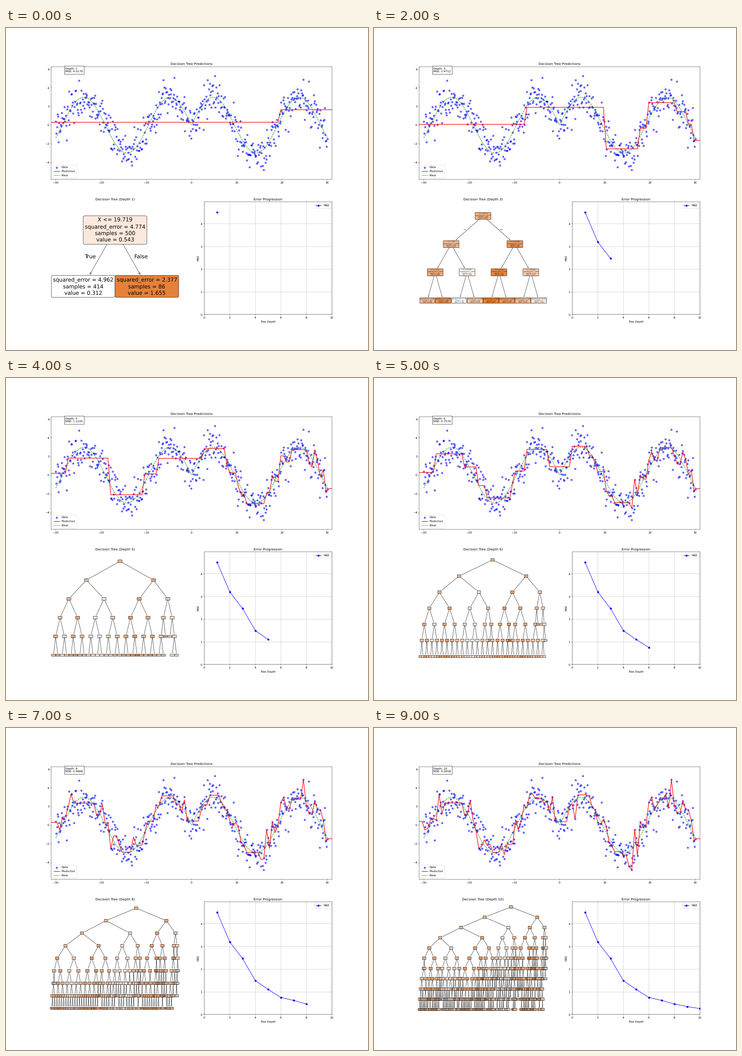
Write a matplotlib script that moves like this. It is 794 by 706 pixels and loops after 10 s.

```python
import numpy as np
import matplotlib.pyplot as plt
from matplotlib.animation import FuncAnimation
from matplotlib.gridspec import GridSpec

plt.rcParams["text.hinting"] = "none"

W, H, DPI = 794, 706, 44
MAX_DEPTH = 10
LEAF_RGB = np.array([229, 129, 57]) / 255


def wave(x):
    return 3 * np.sin(0.33 * np.abs(x))


class Node:
    """Regression tree node over the sorted samples lo..hi."""

    def __init__(self, lo, hi, depth=0):
        part = y[lo:hi]
        self.n, self.depth = hi - lo, depth
        self.value, self.error = part.mean(), part.var()
        self.kids, self.x = [], 0.0
        if depth < MAX_DEPTH and self.n > 1:
            left = np.cumsum(part)[:-1]
            count = np.arange(1, self.n)
            gain = left**2 / count + (part.sum() - left)**2 / (self.n - count)
            cut = lo + 1 + int(np.argmax(gain))
            self.threshold = (X[cut - 1] + X[cut]) / 2
            self.kids = [Node(lo, cut, depth + 1), Node(cut, hi, depth + 1)]

    def children(self, limit):
        return self.kids if self.depth < limit else []

    def walk(self, limit):
        yield self
        for kid in self.children(limit):
            yield from kid.walk(limit)

    def label(self, limit):
        lines = [f"squared_error = {round(float(self.error), 3)}",
                 f"samples = {self.n}",
                 f"value = {round(float(self.value), 3)}"]
        if self.children(limit):
            lines.insert(0, f"X <= {round(float(self.threshold), 3)}")
        return "\n".join(lines)


def cuts(node, limit):
    """Thresholds from left to right."""
    if not node.children(limit):
        return []
    a, b = node.kids
    return cuts(a, limit) + [node.threshold] + cuts(b, limit)


def leaves(node, limit):
    return [n for n in node.walk(limit) if not n.children(limit)]


def arrange(node, limit):
    """Set each child's offset; return the left and right contours."""
    if not node.children(limit):
        return [0.0], [0.0]
    a, b = node.kids
    a_left, a_right = arrange(a, limit)
    b_left, b_right = arrange(b, limit)
    gap = max(r - l + 1 for r, l in zip(a_right, b_left))
    a.x, b.x = -gap / 2, gap / 2
    a_left = [v + a.x for v in a_left]
    a_right = [v + a.x for v in a_right]
    b_left = [v + b.x for v in b_left]
    b_right = [v + b.x for v in b_right]
    return ([0.0] + a_left + b_left[len(a_left):],
            [0.0] + b_right + a_right[len(b_right):])


def draw_tree(ax, limit):
    left, right = arrange(root, limit)
    cols, rows = max(right) - min(left) + 1, limit + 1
    values = [n.value for n in root.walk(limit)]
    low, span = min(values), max(values) - min(values)
    # the widest label, padding included, is about 11.96 em
    col_points = ax.get_window_extent().width / cols * 72 / DPI
    size = max(1.0, col_points / 11.96)
    spacing = 1.31 if size > 2 else 1.75

    def draw(node, x, parent=None):
        pos = ((x + 0.5) / cols, 1 - (node.depth + 0.5) / rows)
        shade = (node.value - low) / span
        fill = shade * LEAF_RGB + 1 - shade
        ax.annotate(
            node.label(limit), parent or pos, pos,
            xycoords="axes fraction", textcoords="axes fraction",
            ha="center", va="center", fontsize=size, linespacing=spacing,
            zorder=100 - 10 * node.depth,
            bbox=dict(boxstyle="round", fc=tuple(fill)),
            arrowprops=dict(arrowstyle="<-", edgecolor="black") if parent else None)
        if node.depth == 1:
            first = node is root.kids[0]
            mid = ((pos[0] + parent[0]) / 2, (pos[1] + parent[1]) / 2)
            ax.annotate("True  " if first else "  False", mid,
                        xycoords="axes fraction", fontsize=size,
                        ha="right" if first else "left")
        for kid in node.children(limit):
            draw(kid, x + kid.x, pos)

    draw(root, -min(left))


np.random.seed(0)
X = np.linspace(-30, 30, 500)
y = wave(X) + np.random.normal(0, 1, X.size)
root = Node(0, X.size)
grid_x = np.linspace(-31, 31, 100)
depths = np.arange(1, MAX_DEPTH + 1)
errors = [sum(n.n * n.error for n in leaves(root, d)) / X.size for d in depths]

fig = plt.figure(figsize=(W / DPI, H / DPI), dpi=DPI)
gs = GridSpec(2, 2, figure=fig)
ax_fit = fig.add_subplot(gs[0, :])
ax_tree = fig.add_subplot(gs[1, 0])
ax_err = fig.add_subplot(gs[1, 1])

ax_fit.scatter(X, y, color="blue", alpha=0.6, label="Data")
fit_line, = ax_fit.plot([], [], color="red", lw=2, label="Prediction")
ax_fit.plot(X, wave(X), "g--", label="Ideal")
ax_fit.set_xlim(-31, 31)
ax_fit.set_ylim(y.min() - 1, y.max() + 1)
ax_fit.set_title("Decision Tree Predictions")
ax_fit.legend(loc="lower left")
info = ax_fit.text(0.05, 0.95, "", transform=ax_fit.transAxes,
                   bbox=dict(facecolor="white"))

err_line, = ax_err.plot([], [], "bo-", label="MSE")
ax_err.set_xlim(0, MAX_DEPTH)
ax_err.set_ylim(0, errors[0] * 1.1)
ax_err.set_title("Error Progression")
ax_err.set_xlabel("Tree Depth")
ax_err.set_ylabel("MSE")
ax_err.grid(True)
ax_err.legend(loc="upper right")


def update(i):
    depth = i + 1
    values = np.array([n.value for n in leaves(root, depth)])
    fit_line.set_data(grid_x, values[np.searchsorted(cuts(root, depth), grid_x)])
    info.set_text(f"Depth: {depth}\nMSE: {errors[i]:.4f}")
    err_line.set_data(depths[:depth], errors[:depth])
    ax_tree.clear()
    ax_tree.set_axis_off()
    ax_tree.set_title(f"Decision Tree (Depth {depth})")
    draw_tree(ax_tree, depth)
    return fit_line, info, err_line


anim = FuncAnimation(fig, update, frames=MAX_DEPTH, interval=1000,
                     repeat=True, repeat_delay=0, blit=False)
plt.show()
```
